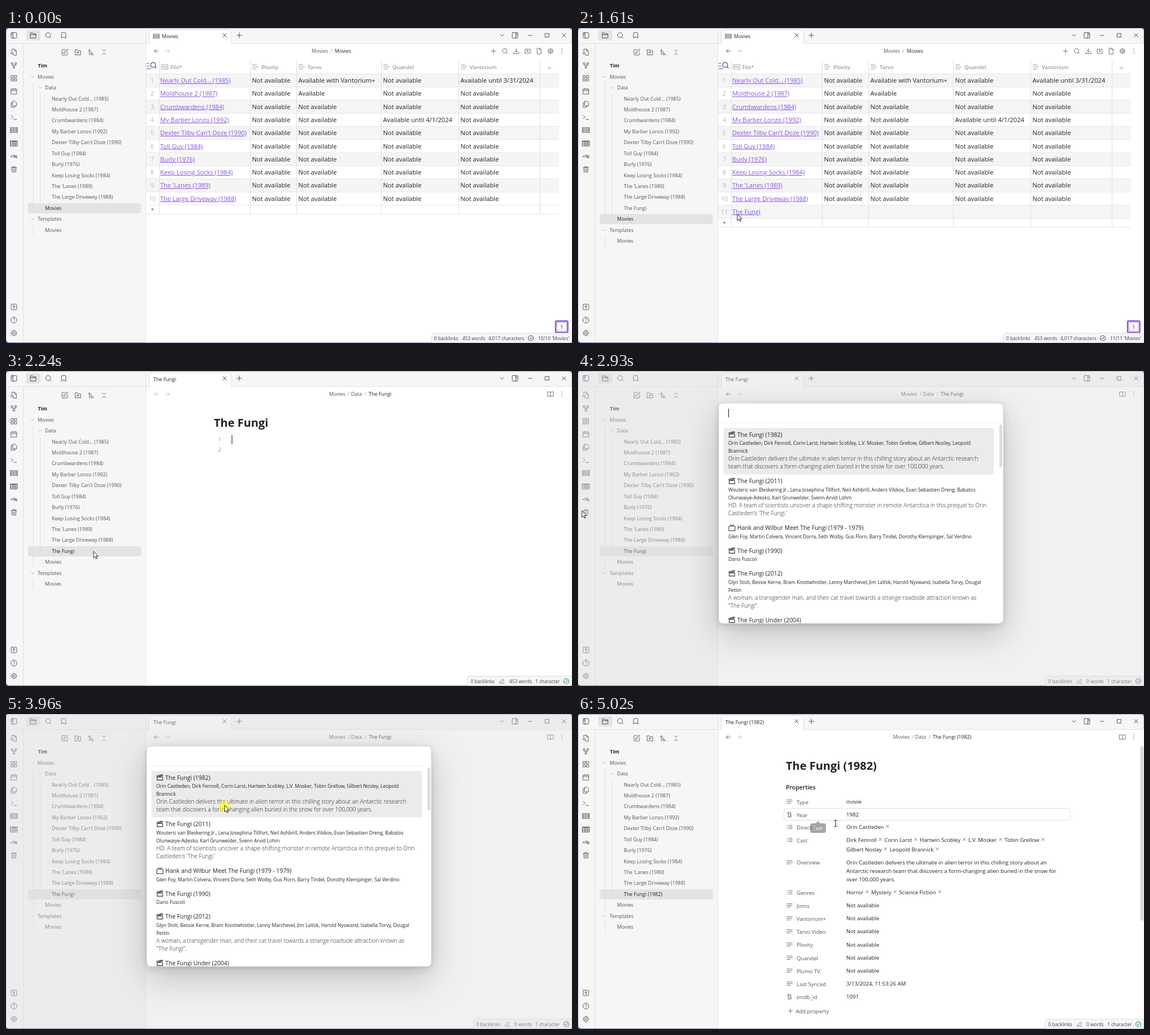
Animation, 1002 px wide and 559 px high, one loop 5.08 s. Source, as an HTML page:

```html
<!DOCTYPE html>
<html lang="en">
<head>
<meta charset="utf-8">
<title>Movie notes</title>
<style>
html, body { margin: 0; width: 100%; height: 100%; overflow: hidden; background: #fff; }
svg { display: block; width: 100vw; height: 100vh; font-family: "Open Sans", "Noto Sans", sans-serif; }
text { white-space: pre; fill: #222; }
.icon { fill: none; stroke: #555; stroke-width: 1.7; stroke-linecap: round; stroke-linejoin: round; }
.link { fill: #8655e0; text-decoration: underline; }
.modal { stroke: #d8d8d8; filter: drop-shadow(0 1px 3px rgba(0,0,0,.07)) drop-shadow(0 4px 8px rgba(0,0,0,.11)) drop-shadow(0 20px 30px rgba(0,0,0,.2)); }
</style>
</head>
<body>
<svg viewBox="0 0 1002 559"><g id="scene"></g><g id="pointer"></g></svg>
<script>
const LOOP = 5080;
const TITLE = 'The Fungi';
const ring = (x, y, r) => `M${x - r} ${y}a${r} ${r} 0 1 0 ${2 * r} 0a${r} ${r} 0 1 0 ${-2 * r} 0`;
const box = 'M5 3h14a2 2 0 0 1 2 2v14a2 2 0 0 1-2 2H5a2 2 0 0 1-2-2V5a2 2 0 0 1 2-2Z';

// Outlines on a 24 unit grid
const ICONS = {
  panelLeft: box + 'M9 3v18M5.5 7h1M5.5 10h1', panelRight: box + 'M15 3v18M17.5 7h1M17.5 10h1',
  folder: 'M3 20V4h7l2 3h9v13ZM3 10h18', folderPlus: 'M3 20V4h7l2 3h9v13ZM12 10v6M9 13h6',
  search: ring(11, 11, 8) + 'M21 21l-4.3-4.3', bookmark: 'M19 21l-7-4-7 4V5a2 2 0 0 1 2-2h10a2 2 0 0 1 2 2Z',
  down: 'M6 9l6 6 6-6', min: 'M6 12h12', max: 'M6 6h12v12H6Z', close: 'M18 6 6 18M6 6l12 12',
  plus: 'M4 12h16M12 4v16', left: 'M12 19l-7-7 7-7M20 12H5', right: 'M4 12h15M12 5l7 7-7 7',
  edit: 'M12 3H5a2 2 0 0 0-2 2v14a2 2 0 0 0 2 2h14a2 2 0 0 0 2-2v-7M18.4 2.6a2 2 0 0 1 3 3L12 15l-4 1 1-4Z',
  sort: 'M3 8l4-4 4 4M7 4v16M11 12h4M11 16h7M11 20h10', collapse: 'M7 20l5-5 5 5M7 4l5 5 5-5',
  fileSearch: 'M5 9V2h9l6 6v14h-8M14 2v6h6' + ring(6, 15, 3.5) + 'M9 18l3 3',
  fork: ring(6, 6, 3) + ring(18, 6, 3) + ring(12, 19, 3) + 'M6 9v3h12V9M12 12v4',
  grid: 'M3 3h7v7H3ZM14 3h7v7h-7ZM14 14h7v7h-7ZM3 14h7v7H3Z', calendar: 'M3 5h18v16H3ZM3 10h18M8 2v4M16 2v4',
  files: 'M8 2h8l5 5v10H8ZM8 7H3v15h12v-5', term: 'M3 17l6-6-6-6M12 19h9',
  rows: 'M1 3h22M1 7h22M1 11h22M1 15h22M1 19h22M1 3v16M23 3v16', table: 'M1 4h22v17H1ZM1 6h22M1 11h22M1 16h22M9 4v17M16 4v17',
  trash: 'M3 6h18M5 6l1 15h12l1-15M8 6V3h8v3M10 10v7M14 10v7', vault: box + ring(12, 10, 2.5) + 'M12 13v4',
  help: ring(12, 12, 10) + 'M9 9a3 3 0 0 1 6 1c0 2-3 2-3 4M12 17v.5',
  gear: ring(12, 12, 7.5) + ring(12, 12, 3) + 'M12 2v2M12 20v2M2 12h2M20 12h2M5 5l1.5 1.5M17.5 17.5l1.5 1.5M5 19l1.5-1.5M17.5 6.5l1.5-1.5',
  download: 'M12 3v12M7 10l5 5 5-5M3 15v6h18v-6', inbox: 'M12 3v11M8 10l4 4 4-4M8 5H3v15h18V5h-5',
  file: 'M14 2H5v20h14V7ZM14 2v5h5', more: 'M12 4.5v.1M12 12v.1M12 19.5v.1',
  book: 'M2 4h7l3 2 3-2h7v15h-7l-3 2-3-2H2ZM12 6v14', head: 'M2 5h14M2 12h20M2 19h14', text: 'M2 6h20M2 12h20M2 18h14',
  list: 'M8 6h14M8 12h14M8 18h14M2 6h1M2 12h1M2 18h1', binary: 'M14 14h4v7h-4ZM6 3h4v7H6ZM6 21h4M6 14h2v7M14 10h4M14 3h2v7',
  md: 'M1 4h22v16H1ZM5 15V9l3 3 3-3v6M17 9v6M15 13l2 2 2-2',
  clap: 'M3 11h18v10H3ZM3 11l-1-4L20 3l1 3.5ZM7 6l3 3.5M13 4.5l3 3.5', tv: 'M2 7h20v15H2ZM17 2l-5 5-5-5',
  pencil: 'M12 20h9M16 4l4 4L8 19l-5 1 1-5Z', check: ring(12, 12, 10) + 'M8 12l3 3 5-6'
};

const icon = (name, x, y, size = 13, attrs = '') =>
  `<path class="icon" d="${ICONS[name]}" transform="translate(${x - size / 2} ${y - size / 2}) scale(${size / 24})" ${attrs}/>`;
const text = (x, y, str, size = 8.9, attrs = '') => `<text x="${x}" y="${y}" font-size="${size}" ${attrs}>${str}</text>`;
const rect = (x, y, w, h, fill, attrs = '') => `<rect x="${x}" y="${y}" width="${w}" height="${h}" fill="${fill}" ${attrs}/>`;
const line = (d, color = '#e0e0e0') => `<path d="${d}" stroke="${color}" fill="none"/>`;
const fill = color => ` style="fill:${color}"`;
const stroke = (color, width = 1.7) => ` style="stroke:${color};stroke-width:${width}"`;
const BOLD = ' font-weight="600"';
const BIG = ' font-weight="700"';
const MID = ' text-anchor="middle"';

const MOVIES = ['Nearly Out Cold... (1985)', 'Moldhouse 2 (1987)', 'Crumbwardens (1984)', 'My Barber Lonzo (1992)',
  "Dexter Tilby Can't Doze (1990)", 'Toll Guy (1984)', 'Burly (1976)', 'Keep Losing Socks (1984)',
  "The 'Lanes (1989)", 'The Large Driveway (1988)'];
const COLUMNS = [[432.5, 'Plovity'], [514.5, 'Tarvo'], [664.5, 'Quandel'], [801.5, 'Vantorium']];
const CELLS = { '0,1': 'Available with Vantorium+', '0,3': 'Available until 3/31/2024', '1,1': 'Available', '3,2': 'Available until 4/1/2024' };

function frame(s) {
  const name = s.full ? TITLE + ' (1982)' : s.note ? TITLE : 'Movies';
  const slash = '<tspan dx="2" style="fill:#999"> / </tspan>';
  const crumbs = (s.note ? ['Movies', 'Data'] : ['Movies']).map(c => c + slash).join('<tspan dx="2"></tspan>');
  let o = rect(0, 0, 1002, 559, '#35558f') + rect(.3, .4, 1001.4, 557.8, '#f6f6f6', 'rx="5"') + rect(247, 28, 754.7, 525, '#fff')
    + rect(247, 540, 750, 18.2, '#fff')
    + line('M0 27.5H1002M30.5 28V558M247.5 0V558')
    + `<path d="M253.5 28V9q0-6 6-6H393q6 0 6 6V28" fill="#fff" stroke="#dcdcdc"/>` + rect(254, 27, 145, 2, '#fff')
    + rect(36, 4, 25, 18, '#e3e3e3', 'rx="4"');
  [['panelLeft', 14], ['folder', 48], ['search', 75], ['bookmark', 102], ['close', 387], ['plus', 413], ['down', 878],
    ['panelRight', 901], ['min', 928], ['max', 958], ['close', 988]].forEach(([n, x]) => o += icon(n, x, 13, 13, stroke('#444')));
  ['fileSearch', 'fork', 'grid', 'calendar', 'files', 'term', 'rows', 'table', '', 'trash'].forEach((n, i) =>
    o += n ? icon(n, 14, 43 + 23.1 * i) : text(14, 231, '&lt;%', 8.8, MID + BOLD + fill('#444')));
  ['vault', 'help', 'gear'].forEach((n, i) => o += icon(n, 14, 495 + 23.2 * i));
  ['edit', 'folderPlus', 'sort', 'collapse'].forEach((n, i) => o += icon(n, 104 + 23.2 * i, 43));
  if (!s.note) o += icon('rows', 266, 15, 11);
  return o + text(s.note ? 261 : 276, 18, name) + icon('left', 266, 41, 12, stroke(s.fresh ? '#bbb' : '#555'))
    + icon('right', 286, 41, 12, stroke('#bbb'))
    + text(s.note ? 627 : 576, 44, `${crumbs}<tspan dx="2" style="fill:#222">${name}</tspan>`, 8.9, MID + fill('#555'));
}

function sidebar(s) {
  const items = s.added ? [...MOVIES, s.full ? TITLE + ' (1982)' : TITLE] : MOVIES;
  const n = items.length;
  const rowY = i => 125.5 + 19.44 * i;
  const selected = s.note ? 10 : n;
  let o = text(56.5, 70, 'Tim', 8.9, BIG);
  if (s.hover) o += rect(39, rowY(10) - 9, 200, 18, '#e8e8e8', 'rx="3"');
  o += rect(39, rowY(selected) - 9, 200, 18, '#e3e3e3', 'rx="3"')
    + line(`M48.5 96V${rowY(n) + 9}M60.5 116V${rowY(n) - 10}M48.5 ${rowY(n + 2) - 9}v18`, '#dedede');
  const label = (x, i, str) => text(x, rowY(i) + 3, str, 8.9, fill(i === selected || s.hover && i === 10 ? '#222' : '#555'));
  [[56, -2, 'Movies'], [69, -1, 'Data'], [56, n + 1, 'Templates']].forEach(([x, i, str]) =>
    o += icon('down', x - 9, rowY(i), 10, stroke('#999')) + label(x, i, str));
  items.forEach((str, i) => o += label(81, i, str));
  return o + label(69, n, 'Movies') + label(69, n + 2, 'Movies');
}

function tableView(s) {
  const files = s.added ? [...MOVIES, TITLE] : MOVIES;
  const top = i => 81.6 + 23.27 * i;
  const end = top(files.length) + 16;
  let o = '', grid = '';
  ['plus', 'search', 'download', 'inbox', 'file', 'gear', 'more'].forEach((n, i) =>
    o += icon(n, 863 + 20.2 * i, 41, 12, n === 'more' ? stroke('#555', 3) : ''));
  files.forEach((f, i) => {
    if (i % 2 === 0) o += rect(248, top(i), 731, 23.27, '#f5f5f5');
    grid += `M248 ${top(i)}H979`;
    const y = top(i) + 15.6;
    o += text(259, y, i + 1, 11.1, MID + fill('#b8b8b8')) + text(273, y, f, 11, 'class="link"');
    if (i < 10) COLUMNS.forEach(([x], c) => o += text(x + 3, y, CELLS[[i, c]] || 'Not available', 11.2));
  });
  o += line(grid + `M248 ${top(files.length)}H979M248 ${end}H979`, '#e6e6e6')
    + line(`M271.5 57V${end}M945.5 57V${end}` + COLUMNS.map(([x]) => `M${x} 57V${end}`).join(''));
  COLUMNS.forEach(([x, str]) => o += icon('head', x + 9, 69, 12, stroke('#888')) + text(x + 19.5, 72.5, str, 9.3, BOLD + fill('#9a9a9a')));
  o += icon('md', 281, 69, 12, stroke('#999')) + text(291, 72.5, 'File*', 9.3, BOLD + fill('#9a9a9a'))
    + icon('search', 261, 66, 13, stroke('#686a9c', 3)) + line('M248.5 62.5h5M248.5 67.5h5M248.5 72.5h9', '#686a9c')
    + icon('plus', 962, 71, 11, stroke('#aaa')) + text(259, end - 5, '+', 9, MID)
    + rect(973, 520, 21.5, 20.5, '#fff', 'rx="2" stroke="#8256e0" stroke-width="2.4"')
    + rect(975.5, 522.5, 16.5, 15.5, '#fff', 'stroke="#b9a3ee"') + text(983.7, 534, '1', 8.9, MID);
  return o;
}

const OVERVIEW = ['Orin Castleden delivers the ultimate in alien terror in this chilling story about an',
  'Antarctic research team that discovers a form-changing alien buried in the snow for', 'over 100,000 years.'];
const CROSS = '<tspan dx="3" font-size="12" style="fill:#888">×</tspan>';
const tags = names => names.map((n, i) => `<tspan dx="${i ? 4 : 0}">${n}</tspan>${CROSS}`).join('');
const NA = ['Not available'];
// key, icon, center line, value lines, line gap
const PROPS = [
  ['Type', 'text', 156, ['movie']], ['Year', 'binary', 179, ['1982']], ['Director', 'list', 201, [tags(['Orin Castleden'])]],
  ['Cast', 'list', 224, [tags(['Dirk Fennoll', 'Corin Larst', 'Hartwin Scobley', 'L.V. Mosker', 'Tobin Grellow']), tags(['Gilbert Nosley', 'Leopold Brannick'])], 17],
  ['Overview', 'text', 263.5, OVERVIEW, 15.2], ['Genres', 'list', 317, [tags(['Horror', 'Mystery', 'Science Fiction'])]],
  ['Jomu', 'text', 340, NA], ['Vantorium+', 'text', 363, NA], ['Tarvo Video', 'text', 386, NA], ['Plovity', 'text', 409.5, NA],
  ['Quandel', 'text', 433, NA], ['Plumo TV', 'text', 456, NA], ['Last Synced', 'text', 479, ['3/13/2024, 11:53:26 AM']], ['tmdb_id', 'binary', 502, ['1091']]
];

function noteView(s) {
  let o = icon('book', 964, 41, 12) + icon('more', 984, 41, 12, stroke('#555', 3))
    + text(368, 99, s.full ? TITLE + ' (1982)' : TITLE, 20, BIG);
  if (!s.full) {
    return o + text(378, 125, '1', 8.2, MID + fill('#888')) + text(378, 143, '2', 8.2, MID + fill('#888'))
      + rect(399.5, 114, 1.1, 16, '#222');
  }
  o += text(368, 133.5, 'Properties', 10.5, BOLD);
  if (s.prop >= 0) o += rect(364.5, 144.5 + 23 * s.prop, 507, 21, '#fff', 'rx="4" stroke="#dedede"');
  PROPS.forEach(([key, ic, y, lines, gap]) => {
    o += icon(ic, 374.5, y - .5, 11.5) + text(387, y + 3.5, key, 9.5, fill('#555'));
    lines.forEach((str, i) => o += text(475, y + 3.3 + (gap || 0) * i, str, 9.6));
  });
  o += icon('plus', 376, 527, 11) + text(385.5, 531, 'Add property', 9.5, fill('#555')) + rect(995.5, 57, 5.5, 310, '#d9d9d9', 'rx="2.7"');
  if (s.tip) o += `<g opacity=".65">${rect(411, 194, 28, 17, '#777', 'rx="4"')}<path d="M421 194l4-4 4 4Z" fill="#777"/>${text(425, 205.5, 'Year', 8.6, MID + fill('#fff'))}</g>`;
  return o;
}

function statusBar(s) {
  const x = !s.note ? 753 : s.fresh ? 817 : 827;
  const parts = !s.note ? [[758, '0 backlinks'], [808, '453 words'], [854, '4,017 characters'], [942, `${s.added ? '11/11' : '10/10'} 'Movies'`]]
    : [[x + 5.5, '0 backlinks'], [s.fresh ? 891 : 900, s.fresh ? '453 words' : '0 words'], [937, '1 character']];
  return `<path d="M${x}.5 558.2V547q0-5.5 5.5-5.5H1001.7V558.2Z" fill="#f6f6f6" stroke="#dedede"/>`
    + parts.map(([px, str]) => text(px, 554, str, 8.3, fill('#444'))).join('')
    + (s.note ? icon('pencil', x + 61, 550.5, 11) : '')
    + icon('check', s.note ? 992 : 929, 550.5, 11, stroke(s.green ? '#159a50' : s.note ? '#444' : '#35594a', 2.2));
}

function dialog(s) {
  const gray = fill('#555');
  let o = rect(299, 194, 404, 171, '#fff', 'rx="7" class="modal"') + icon('close', 685, 208, 12, stroke('#444'))
    + text(311, 234.5, 'Add row', 16.2, BOLD) + text(311, 260, 'Filename', 10.1) + text(311, 275, 'Filename associated with the new row', 8.15, gray)
    + line('M311 286.5H691') + text(311, 305, 'Row Template', 10.1);
  ['Select from the existing templates to create a new row.', 'The list is related with template folder setting. Leave', 'empty to create an empty file.']
    .forEach((str, i) => o += text(311, 320 + 11.6 * i, str, 8.15, gray));
  return o + rect(535.5, 252.5, 119.5, 21.5, '#fff', 'rx="4" stroke="#777" stroke-width="1.8"')
    + text(542, 267, TITLE.slice(0, s.typed), 8.9, 'id="typed"') + rect(543, 257, 1, 12, '#222', 'id="caret"')
    + rect(661.5, 252.5, 29, 21.5, '#fff', 'rx="4" stroke="#dcdcdc"') + icon('edit', 676, 263, 13, stroke('#333'))
    + rect(537.5, 309.5, 153, 21, '#fff', 'rx="4" stroke="#dcdcdc"') + icon('search', 549, 320, 12) + text(564, 323.5, 'Templates/Movies.md', 8.8)
    + `<circle cx="680" cy="320" r="5" fill="#555"/>` + icon('close', 680, 320, 7, stroke('#fff', 3));
}

// heading, center line, cast lines, summary lines
const RESULTS = [
  [TITLE + ' (1982)', 113, ['Orin Castleden, Dirk Fennoll, Corin Larst, Hartwin Scobley, L.V. Mosker, Tobin Grellow, Gilbert Nosley, Leopold', 'Brannick'],
    ['Orin Castleden delivers the ultimate in alien terror in this chilling story about an Antarctic research', 'team that discovers a form-changing alien buried in the snow for over 100,000 years.']],
  [TITLE + ' (2011)', 195.5, ['Wouteric van Bleskering Jr., Lena Josephina Tillfort, Neil Ashbrill, Anders Vilskov, Evan Sebastien Dreng, Babatos', 'Olunwaiye-Adesko, Karl Grunwelder, Svenn Arvid Lohm'],
    ['HD. A team of scientists uncover a shape-shifting monster in remote Antarctica in this prequel to Orin', `Castleden's '${TITLE}.'`]],
  [`Hank and Wilbur Meet ${TITLE} (1979 - 1979)`, 278.5, ['Glen Foy, Martin Colvera, Vincent Dorra, Seth Wolby, Gus Florn, Barry Tindel, Dorothy Klempinger, Sal Verdino'], []],
  [TITLE + ' (1990)', 319, ['Dario Fuscoli'], []],
  [TITLE + ' (2012)', 359.5, ['Glyn Stolt, Bessie Kerne, Bram Knottwhistler, Lenny Marchevel, Jim LaVok, Harold Nyswand, Isabella Torvy, Dougal', 'Pettin'],
    ['A woman, a transgender man, and their cat travel towards a strange roadside attraction known as', `"${TITLE}".`]],
  [TITLE + ' Under (2004)', 442, [], []]
];

function picker(s) {
  let o = rect(249, 57, 504, 391, '#fff', 'rx="7" class="modal"') + line('M249 92.5H753', '#f1f1f1')
    + rect(257.5, s.second ? 184 : 101, 478.5, 82.5, '#ebebeb', 'rx="3"') + rect(746, 95, 5, 76, '#dcdcdc', 'rx="2.5"');
  if (s.caret) o += rect(266, 67, 1.1, 15, '#222');
  o += '<clipPath id="sheet"><rect x="249" y="57" width="504" height="390.5" rx="7"/></clipPath><g clip-path="url(#sheet)">';
  RESULTS.forEach(([title, y, cast, summary], i) => {
    o += icon(i === 2 ? 'tv' : 'clap', 272.5, y - .5, 13, stroke('#333', 2)) + text(282, y + 3.7, title, 10.4);
    cast.forEach((str, k) => o += text(266, y + 18 + 14 * k, str, 8.5));
    summary.forEach((str, k) => o += text(266, y + 46 + 14 * k, str, 10.1, 'font-weight="300"' + fill('#222')));
  });
  return o + '</g>';
}

const PATH = [[70, 320, 395], [350, 258, 322], [560, 258, 322], [700, 282, 330], [1680, 282, 330], [1890, 210, 321], [2030, 155, 320],
  [2300, 155, 320], [2720, 7, 248], [2990, 7, 248], [3330, 250, 243], [3400, 264, 240], [3890, 387, 162], [4230, 387, 162],
  [4430, 392, 159], [4620, 404, 164], [4880, 404, 164], [5020, 456, 194]];
const CLICKS = [420, 2100, 2790, 3960];
const KEYS = [700, 760, 830, 900, 1090, 1220, 1290, 1350, 1420];
const within = (t, a, b) => t >= a && t < b;

function pointerAt(t) {
  const i = PATH.findIndex(p => p[0] > t);
  if (i < 1) return PATH[i < 0 ? PATH.length - 1 : 0].slice(1);
  const [t0, x0, y0] = PATH[i - 1], [t1, x1, y1] = PATH[i], k = (t - t0) / (t1 - t0);
  return [x0 + (x1 - x0) * k, y0 + (y1 - y0) * k];
}

function stateAt(t, [x, y]) {
  const pick = within(t, 2860, 4030);
  return {
    added: t >= 1610, note: t >= 2170, fresh: within(t, 2170, 2300), full: t >= 4100,
    dlg: within(t, 490, 1550), typed: KEYS.filter(k => k <= t).length,
    pick, second: pick && x > 257 && y > 184, caret: t < 3500,
    hover: within(t, 1610, 2170) && x < 239, green: within(t, 2170, 2560) || t >= 4490,
    prop: t >= 4950 ? 1 : t >= 4230 ? 0 : -1, tip: t >= 5000
  };
}

function draw(s) {
  let o = frame(s) + sidebar(s) + (s.note ? noteView(s) : tableView(s)) + statusBar(s);
  if (s.dlg || s.pick) o += rect(0, 0, 1002, 558.2, 'rgba(220,220,220,.4)') + (s.dlg ? dialog(s) : picker(s));
  return o;
}

const scene = document.getElementById('scene');
const pointer = document.getElementById('pointer');
const ARROW = '<path d="M0 0V11.6l2.7-2.5 1.8 4.2 1.8-.8-1.8-4H8Z" fill="#fff" stroke="#111" stroke-width=".9"/>';
const BEAM = '<path d="M-2.5-5.5h2l.5.5.5-.5h2M0-5V5M-2.5 5.5h2l.5-.5.5.5h2" fill="none" stroke="#111"/>';
const GLOW = '<circle cx="0" cy="2" r="10" fill="#ff0" opacity=".65"/>';
const start = performance.now();
let shown = '', shape = '';

function tick() {
  const t = (performance.now() - start) % LOOP;
  const at = pointerAt(t);
  const state = stateAt(t, at);
  const key = JSON.stringify(state);
  if (key !== shown) {
    shown = key;
    scene.innerHTML = draw(state);
    if (state.dlg) document.getElementById('caret').setAttribute('x', 542 + document.getElementById('typed').getComputedTextLength());
  }
  const next = t < 70 ? '' : (CLICKS.some(c => within(t, c, c + 70)) ? GLOW : '') + (t >= 4950 ? BEAM : ARROW);
  if (next !== shape) pointer.innerHTML = shape = next;
  pointer.setAttribute('transform', `translate(${at})`);
  requestAnimationFrame(tick);
}
tick();
</script>
</body>
</html>
```
